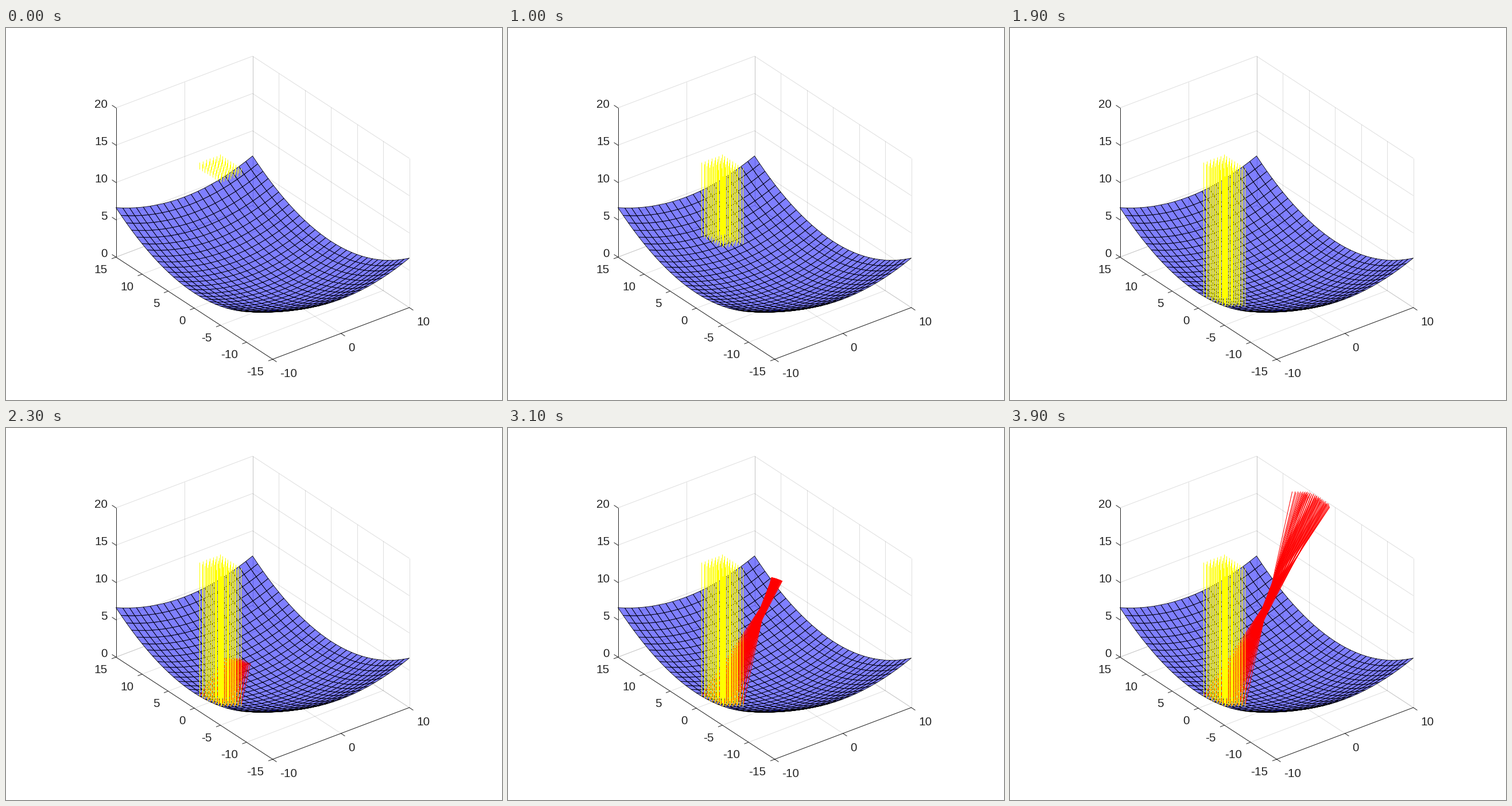
These frames come from a looping animation (864x648 px, 4 s). A matplotlib script:

```python
import numpy as np
import matplotlib.pyplot as plt
from matplotlib.animation import FuncAnimation
from matplotlib.collections import LineCollection, PolyCollection

W, H, DPI = 864, 648, 72
FRAMES, STEPS = 40, 20
TOP = 20
INK = "#262626"


def project(x, y, z):
    """Orthographic view of the data box, in stage pixels."""
    x, y, z = np.broadcast_arrays(x, y, z)
    sx = 464.5 + 11.9 * (x + 10) - 9.1 * (y + 15)
    sy = 577 - 4.5 * (x + 10) - 5.93 * (y + 15) - 13.0 * z
    return np.stack([sx, sy], axis=-1)


def bowl(x, y):
    return (x**2 + y**2) / 49


fig = plt.figure(figsize=(W / DPI, H / DPI), dpi=DPI, facecolor="white")
ax = fig.add_axes([0, 0, 1, 1])
ax.set_xlim(0, W)
ax.set_ylim(H, 0)
ax.axis("off")


def segment(a, b, **style):
    ends = np.array([project(*a), project(*b)])
    ax.plot(ends[:, 0], ends[:, 1], lw=1, solid_capstyle="butt", **style)


def tick(point, step, label, offset, ha):
    p = project(*point)
    q = p + step
    ax.plot([p[0], q[0]], [p[1], q[1]], color=INK, lw=1, zorder=2)
    ax.text(p[0] + offset[0], p[1] + offset[1], label, color=INK, ha=ha,
            va="center_baseline", fontsize=20.8, family="Liberation Sans")


def draw_box():
    grid = dict(color=INK, alpha=0.15, zorder=1)
    axis = dict(color=INK, zorder=2)
    for x in (-10, 0, 10):
        segment((x, -15, 0), (x, 15, 0), **grid)
        segment((x, 15, 0), (x, 15, TOP), **grid)
        tick((x, -15, 0), (6.5, 4.3), str(x), (13, 23.5), "left")
    for y in range(-15, 16, 5):
        segment((-10, y, 0), (10, y, 0), **grid)
        segment((10, y, 0), (10, y, TOP), **grid)
        tick((-10, y, 0), (-7, 2.7), str(y), (-15, 20.5), "right")
    for z in range(0, TOP + 1, 5):
        segment((-10, 15, z), (10, 15, z), **grid)
        segment((10, -15, z), (10, 15, z), **grid)
        tick((-10, 15, z), (-6.5, -4.3), str(z), (-14.5, -7.5), "right")
    segment((-10, -15, 0), (10, -15, 0), **axis)
    segment((-10, -15, 0), (-10, 15, 0), **axis)
    segment((-10, 15, 0), (-10, 15, TOP), **axis)


def draw_bowl():
    x, y = np.meshgrid(np.arange(-10, 11), np.arange(-15, 16))
    z = bowl(x, y)
    depth = 0.866 * (9 * x + 11.9 * y) - 7.5 * z

    def corners(a):
        return np.stack([a[:-1, :-1], a[:-1, 1:], a[1:, 1:], a[1:, :-1]], axis=-1)

    quads = project(corners(x), corners(y), corners(z)).reshape(-1, 4, 2)
    order = np.argsort(-corners(depth).mean(axis=-1).ravel())
    ax.add_collection(PolyCollection(
        quads[order], facecolors=[(0, 0, 1, 0.5)], edgecolors="black",
        linewidths=0.8, zorder=3))


draw_box()
draw_bowl()

# Bundle of vertical rays and the points where they meet the bowl
rx, ry = (a.ravel() for a in np.meshgrid(np.linspace(-10, -7, 7),
                                         np.linspace(-5, -1, 9)))
rz = bowl(rx, ry)
start = project(rx, ry, TOP)
hit = project(rx, ry, rz)

# Reflected rays cross the bowl's axis and climb to the top of the box
bend = 2.36 * (50 / (rx**2 + ry**2)) ** 0.2
dx, dy, dz = -bend * rx, -bend * ry, TOP - rz
reach = (10 - rx) / dx

bounced = LineCollection([], colors="#ff0000", linewidths=1, zorder=4)
falling = LineCollection([], colors="#ffff00", linewidths=1, zorder=5)
ax.add_collection(bounced)
ax.add_collection(falling)


def update(i):
    down = min(1, (i + 1) / STEPS)
    falling.set_segments(np.stack([start, start + down * (hit - start)], axis=1))
    up = (i + 1 - STEPS) / STEPS
    if up > 0:
        t = np.minimum(up, reach)
        tips = project(rx + t * dx, ry + t * dy, rz + t * dz)
        bounced.set_segments(np.stack([hit, tips], axis=1))
    else:
        bounced.set_segments([])
    return bounced, falling


anim = FuncAnimation(fig, update, frames=FRAMES, interval=100,
                     repeat=True, repeat_delay=0)
plt.show()
```
